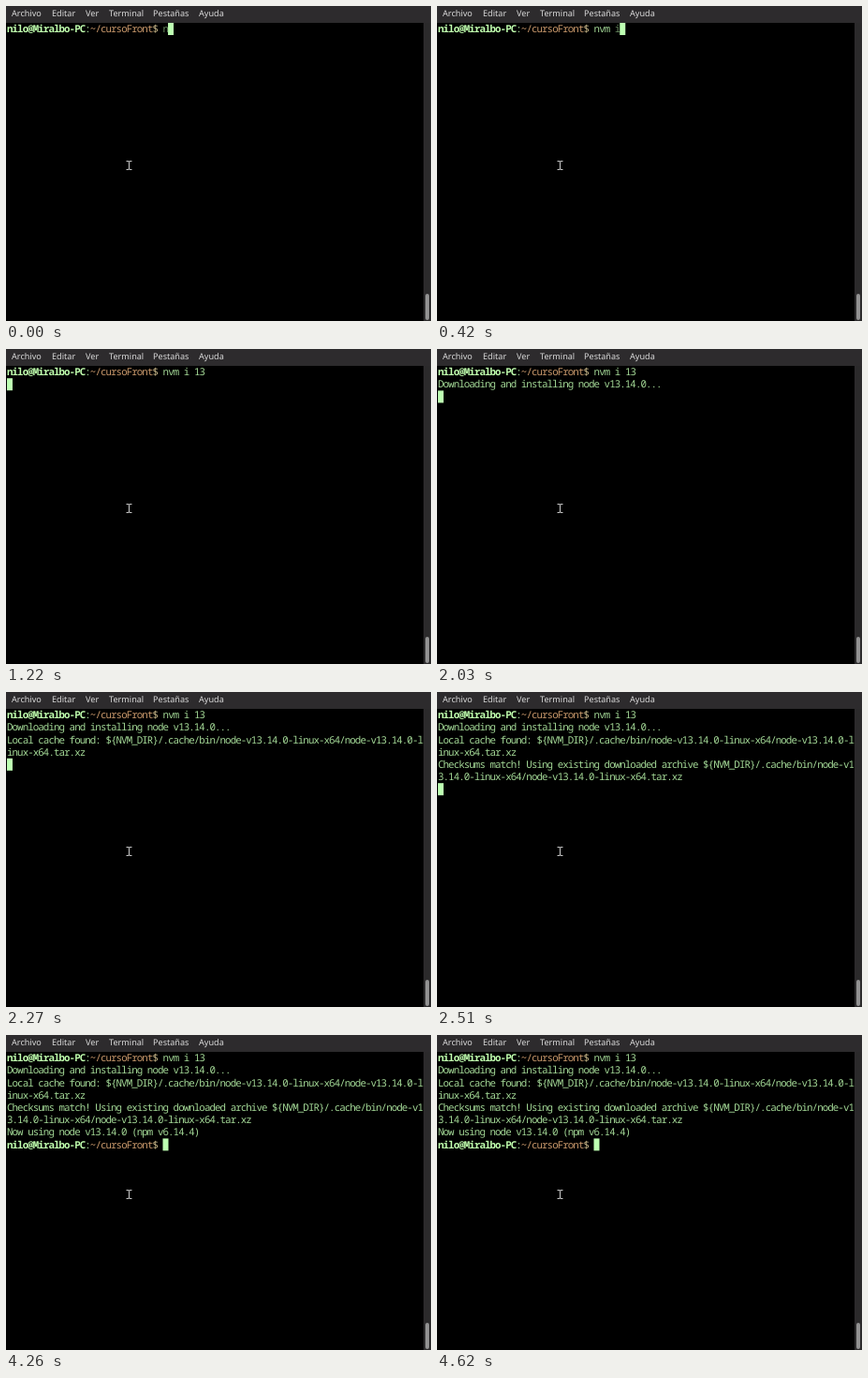
An HTML page that plays this animation: 454x336 px, repeating every 5400 ms.

```html
<!DOCTYPE html>
<html lang="es">
<head>
<meta charset="utf-8">
<title>Terminal</title>
<style>
  html, body { margin: 0; width: 100%; height: 100%; overflow: hidden; background: #000; }
  .stage { position: relative; width: 454px; height: 336px; overflow: hidden; background: #000; }
  .menu {
    position: absolute; inset: 0 0 auto; height: 17.5px; background: #2d2b2d;
    color: #d9d9d9; font: 9.1px/16px "Noto Sans", sans-serif; text-rendering: geometricPrecision;
  }
  .menu span { position: absolute; top: 0; }
  .track { position: absolute; left: 446px; top: 17.5px; width: 8px; bottom: 0; background: #2b2a2b; }
  .thumb { position: absolute; left: 2px; top: 289px; width: 4px; height: 28px; border-radius: 2px; background: #929292; }
  .screen {
    --w: 5.55px; --h: 13.2px;
    position: absolute; left: 1px; top: 18.3px; width: 445px; height: 317px;
    color: #a3d896; white-space: pre; text-rendering: geometricPrecision;
    font: 10.8px/13.2px "Noto Sans Mono", "DejaVu Sans Mono", monospace;
    font-stretch: extra-condensed; letter-spacing: calc(5.55px - 1ch);
  }
  .row { height: var(--h); }
  .user { color: #c0ffae; font-weight: 700; }
  .path { color: #cb9a6c; font-weight: 500; }
  .sign { color: #cdbb8c; }
  .caret { position: absolute; left: 0; top: 0; width: 5.6px; height: 13.2px; background: #bdffb2; }
  .mouse { position: absolute; left: 126px; top: 163px; }
</style>
</head>
<body>
<div class="stage">
  <div class="menu">
    <span style="left:6px">Archivo</span><span style="left:49px">Editar</span>
    <span style="left:85px">Ver</span><span style="left:110px">Terminal</span>
    <span style="left:157px">Pestañas</span><span style="left:206px">Ayuda</span>
  </div>
  <div class="screen" id="screen"><div class="caret" id="caret"></div></div>
  <div class="track"><div class="thumb"></div></div>
  <svg class="mouse" width="11" height="14" fill="none">
    <path d="M2.5 2.5H4.5L5.5 3.3L6.5 2.5H8.5M5.5 3V11M2.5 11.5H4.5L5.5 10.7L6.5 11.5H8.5" stroke="#c4c4c4" stroke-width="1.1"/>
  </svg>
</div>
<script>
const LOOP = 5400, SETTLE = 60, PROMPT_COLS = 30;
const screen = document.getElementById('screen');
const caret = document.getElementById('caret');
const prompt = '<span class="user">nilo@Miralbo-PC</span>:' +
  '<span class="path">~/cursoFront</span><span class="sign">$</span> ';

// Typed command: [time, character]
const keys = [[0, 'n'], [60, 'v'], [150, 'm'], [240, ' '], [420, 'i'], [600, ' '], [780, '1'], [970, '3']];

// Printed rows: [time, content]
const output = [
  [1790, 'Downloading and installing node v13.14.0...'],
  [2210, 'Local cache found: ${NVM_DIR}/.cache/bin/node-v13.14.0-linux-x64/node-v13.14.0-l'],
  [2210, 'inux-x64.tar.xz'],
  [2330, 'Checksums match! Using existing downloaded archive ${NVM_DIR}/.cache/bin/node-v1'],
  [2330, '3.14.0-linux-x64/node-v13.14.0-linux-x64.tar.xz'],
  [4140, 'Now using node v13.14.0 (npm v6.14.4)'],
  [4260, prompt]
];

// Caret stops: [time, column, row]
const stops = [
  ...keys.map(([t], i) => [t, PROMPT_COLS + i + 1, 0]),
  [1220, 0, 1], [1790, 0, 2], [2210, 0, 4], [2330, 0, 6], [4140, 0, 7], [4260, PROMPT_COLS, 7]
];

function add(tag, parent, html) {
  const el = document.createElement(tag);
  el.innerHTML = html;
  parent.append(el);
  return el;
}

function addRow(html) {
  const row = add('div', screen, html);
  row.className = 'row';
  return row;
}

const first = addRow(prompt);
const letters = keys.map(([at, ch]) => ({ at, el: add('span', first, ch) }));
const rows = output.map(([at, html]) => ({ at, el: addRow(html) }));
const start = performance.now();

function draw() {
  const t = (performance.now() - start) % LOOP;
  for (const { at, el } of letters) el.style.opacity = t < at ? 0 : t < at + SETTLE ? 0.65 : 1;
  for (const { at, el } of rows) el.style.opacity = t < at ? 0 : 1;
  const [, col, row] = stops.findLast(([at]) => at <= t);
  caret.style.transform = `translate(calc(var(--w) * ${col}), calc(var(--h) * ${row}))`;
  requestAnimationFrame(draw);
}
draw();
</script>
</body>
</html>
```
